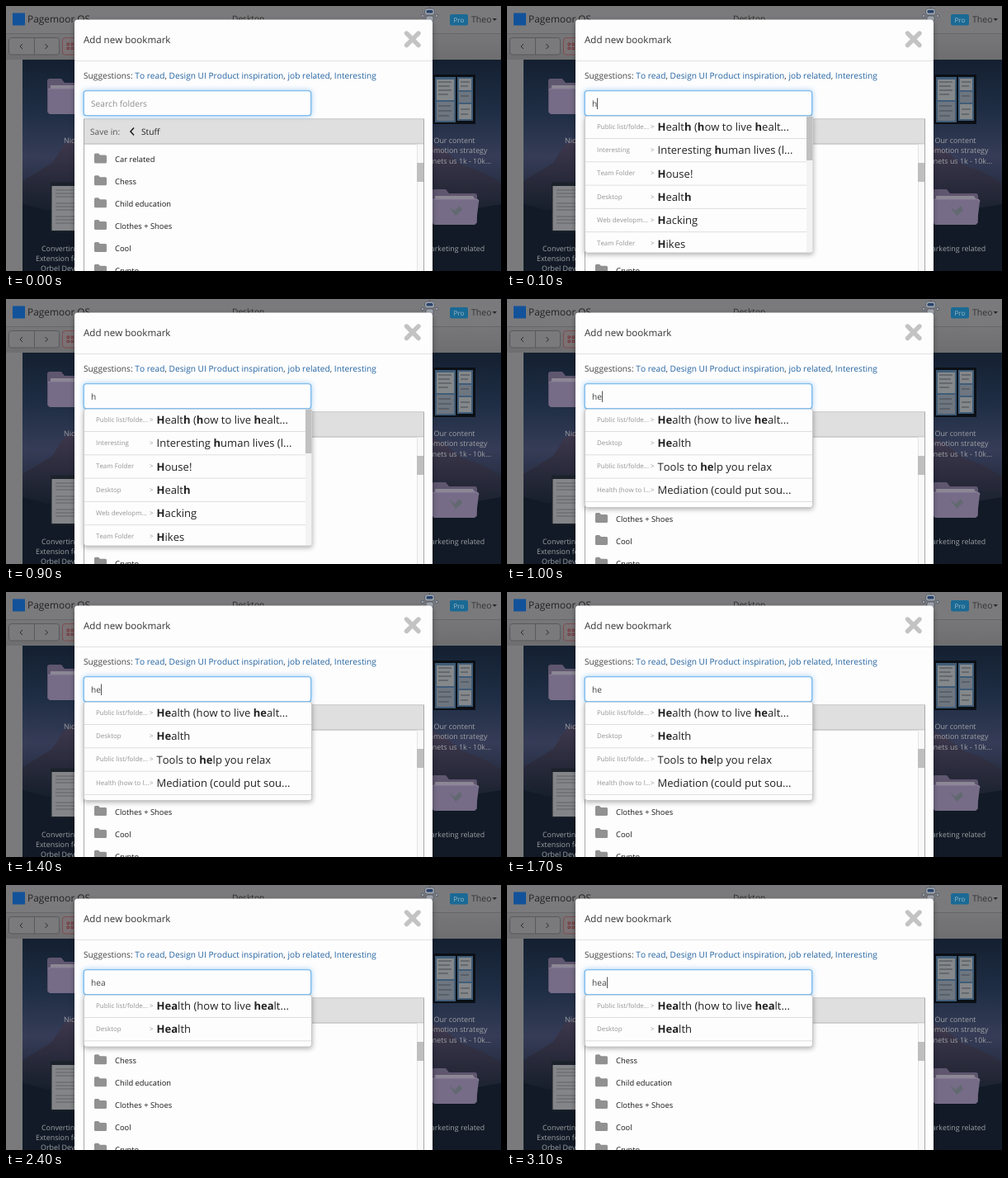
Recreate the animation shown at these times as an HTML page. Size 600 px wide and 321 px high, loop 3200 ms.

```html
<!DOCTYPE html>
<html lang="en">
<head>
<meta charset="utf-8">
<title>Add new bookmark</title>
<style>
html, body { margin: 0; width: 100%; height: 100%; overflow: hidden; background: #7c7c7e; }
svg { display: block; width: 100vw; height: 100vh; }
text {
  font-family: "Open Sans", "Noto Sans", sans-serif; white-space: pre;
  font-kerning: none; text-rendering: geometricPrecision;
}
.mid { font-size: 10.18px; }
.desk { font-size: 8.9px; fill: #a0a2a6; }
.item { font-size: 9.4px; fill: #1a1a1a; }
.crumb { font-size: 7.95px; fill: #959595; }
.hit { font-size: 13.05px; fill: #222; }
.hit tspan { font-weight: 700; }
.link { fill: #23639f; }
</style>
</head>
<body>
<svg viewBox="0 0 600 321" preserveAspectRatio="none">
  <defs>
    <linearGradient id="sky" x1="0" y1="0" x2="0" y2="1">
      <stop offset="0" stop-color="#142031"/>
      <stop offset=".25" stop-color="#1f2e45"/>
      <stop offset=".46" stop-color="#363c57"/>
      <stop offset=".7" stop-color="#1a2434"/>
      <stop offset="1" stop-color="#0d1621"/>
    </linearGradient>
    <linearGradient id="rock" x1="0" y1="0" x2="0" y2="1">
      <stop offset="0" stop-color="#40394e"/>
      <stop offset="1" stop-color="#151e2b"/>
    </linearGradient>
    <linearGradient id="tools" x1="0" y1="0" x2="0" y2="1">
      <stop offset="0" stop-color="#777779"/>
      <stop offset="1" stop-color="#6e6e70"/>
    </linearGradient>
    <filter id="soft" x="-20%" y="-40%" width="140%" height="180%"><feGaussianBlur stdDeviation="3"/></filter>
    <clipPath id="listClip"><rect x="94" y="167" width="404" height="154"/></clipPath>
    <g id="folder">
      <path d="M0 3q0-3 3-3h14l4 5h31q3 0 3 3v33H0z" fill="#5f566f"/>
      <path d="M4 8h46l3 5H4z" fill="#8c8794"/>
      <path d="M1 14q0-2 2-2h51q3 0 3 3l-3 25q0 3-3 3H4q-3 0-3-3z" fill="#766c87"/>
      <path d="M1 14q0-2 2-2h51q3 0 3 3" fill="none" stroke="#8a809a"/>
    </g>
    <path id="dir" d="M0 1.500Q0 0 1.500 0H5l2 2h6.500Q15 2 15 3.500V10.500Q15 12 13.500 12H1.500Q0 12 0 10.500z" fill="#919191"/>
  </defs>

  <g id="backdrop">
    <rect width="600" height="321" fill="#7a7a7c"/>
    <rect y="33" width="600" height="32" fill="url(#tools)"/>
    <path d="M0 33.500H600" stroke="#666668"/>
    <rect x="8" y="8.500" width="15" height="15" fill="#12529a"/>
    <text x="26" y="20.300" font-size="11.9" fill="#232325">Pagemoor OS</text>
    <text class="mid" x="274" y="19.200" fill="#2a2a2c">Desktop</text>
    <g fill="#9ea3ab" stroke="#48505e" stroke-width=".7">
      <path d="M513.500 1V4"/>
      <rect x="507.500" y="3" width="12" height="8" rx="3"/>
      <rect x="509" y="12" width="9" height="7" rx="2"/>
      <circle cx="505" cy="12" r="1.800"/><circle cx="522" cy="12" r="1.800"/>
    </g>
    <rect x="509.500" y="5" width="8" height="3.500" rx="1.500" fill="#28436b"/>
    <rect x="538" y="10" width="22" height="13.500" rx="2" fill="#1a6a95"/>
    <text x="549" y="19.800" font-size="8" text-anchor="middle" fill="#a3bac6">Pro</text>
    <text x="564" y="20.400" font-size="10.6" fill="#333335">Theo</text>
    <path d="M589.500 15h5.500l-2.750 3z" fill="#29292b"/>

    <rect x="3.500" y="38.500" width="61" height="20.500" rx="3" fill="#7a7a7c" stroke="#59595b"/>
    <path d="M34.500 39v20" stroke="#59595b"/>
    <path d="M20 46l-3 3 3 3M47.500 46l3 3-3 3" fill="none" stroke="#2a2a2c"/>
    <rect x="68.500" y="38.500" width="30" height="20.500" rx="3" fill="#7a7274" stroke="#7d4d50"/>
    <path d="M74 45h2.500v2.500h-2.500zM79 45h2.500v2.500h-2.500zM74 50h2.500v2.500h-2.500zM79 50h2.500v2.500h-2.500z" fill="none" stroke="#743338"/>

    <rect x="20" y="65" width="580" height="256" fill="url(#sky)"/>
    <path d="M20 212L40 200 56 190 70 168 83 160V250H20z" fill="url(#rock)"/>
    <path d="M517 168L532 176 552 192 574 200 600 214V262H517z" fill="url(#rock)"/>
    <path d="M20 240L50 248 83 238V321H20zM517 250L565 246 600 240V321H517z" fill="#111a26"/>

    <use href="#folder" x="50" y="88"/>
    <text class="desk" x="70" y="165.500">Nice</text>
    <rect x="54" y="213.500" width="50" height="60" fill="#1c222b"/>
    <rect x="55.500" y="218" width="48" height="54" fill="#848588"/>
    <path d="M60 223h26M60 227h32M60 231h30M60 239h32M60 243h28M60 247h32M60 255h24M60 259h30M60 263h30" stroke="#616266"/>
    <text class="desk" x="43" y="296.500">Converting</text>
    <text class="desk" x="36" y="308.500">Extension for</text>
    <text class="desk" x="42" y="320.500">Orbel Dev</text>

    <rect x="518" y="83" width="51" height="60" fill="#0b0f15"/>
    <path d="M520 86h25v55h-25zM547 86h19v53h-19z" fill="#405d78"/>
    <path d="M522 89h21v25h-21zM549 88h15v14h-15zM549 119h15v18h-15z" fill="#85888b"/>
    <path d="M522 116h21v23h-21zM549 104h15v13h-15z" fill="#6e7680"/>
    <path d="M524 92h16M524 97h14M524 102h16M524 107h12M551 92h11M551 97h9M524 121h15M524 127h16M524 133h13M551 109h10M551 125h11M551 131h9" stroke="#444a53"/>
    <text class="desk" x="543.500" y="165.500" text-anchor="middle">Our content</text>
    <text class="desk" x="543.500" y="178" text-anchor="middle">promotion strategy</text>
    <text class="desk" x="588" y="190.500" text-anchor="end">nets us 1k - 10k...</text>
    <use href="#folder" x="516" y="222"/>
    <path d="M537 243l7 5 6-6 3 5-8 7z" fill="#626970"/>
    <text class="desk" x="543.500" y="296.500" text-anchor="middle">Marketing related</text>
  </g>

  <rect x="83" y="19" width="434" height="330" rx="4" fill="#000" opacity=".35" filter="url(#soft)"/>
  <rect x="83" y="16.500" width="434" height="330" rx="4" fill="#fdfdfe"/>
  <text x="94" y="45" font-size="11.6" fill="#333">Add new bookmark</text>
  <path d="M485.500 33L500 47.500M500 33L485.500 47.500" stroke="#c3c3c3" stroke-width="5.400" stroke-linecap="round"/>
  <path d="M83 66.500H517" stroke="#e2e2e2"/>
  <text class="mid" x="94" y="88" fill="#444">Suggestions: <tspan class="link">To read</tspan>, <tspan class="link">Design UI Product inspiration</tspan>, <tspan class="link">job related</tspan>, <tspan class="link">Interesting</tspan></text>

  <rect x="94.500" y="137" width="412" height="200" fill="#fdfdfe" stroke="#a9a9a9"/>
  <rect x="95" y="137.500" width="411" height="29" fill="#dfdfdf"/>
  <path d="M94 167H506" stroke="#a9a9a9"/>
  <text class="mid" x="102" y="155.500" fill="#555">Save in:</text>
  <path d="M155 147.500l-4 4.500 4 4.500" fill="none" stroke="#222" stroke-width="1.600"/>
  <text class="mid" x="164" y="155.500" fill="#222">Stuff</text>
  <g id="list" clip-path="url(#listClip)"></g>
  <rect x="498" y="167.500" width="8" height="154" fill="#f8f8f8"/>
  <path d="M498.500 167.500V321" stroke="#e4e4e4"/>
  <rect x="498" y="190" width="8" height="23" fill="#bfbfbf"/>

  <rect x="93.500" y="102" width="277" height="31.500" rx="4" fill="#66afe9" opacity=".6" filter="url(#soft)"/>
  <g id="menu">
    <rect class="h" x="94" y="135" width="277" fill="#000" opacity=".32" filter="url(#soft)"/>
    <rect class="h" x="94.500" y="133" width="276" rx="3" fill="#fdfdfe" stroke="#c8c8c8"/>
    <g id="rows"></g>
    <g id="bar">
      <rect x="363" y="134" width="7.500" height="164" fill="#f3f3f3"/>
      <rect x="363" y="134" width="7.500" height="53" fill="#c1c1c1"/>
    </g>
  </g>

  <rect x="94.200" y="102.700" width="275.500" height="30" rx="3" fill="#fdfdfe" stroke="#66afe9" stroke-width="1.100"/>
  <text id="query" class="mid" x="103" y="122"></text>
  <path id="caret" stroke="#555"/>
</svg>
<script>
const LOOP = 3200, BLINK = 500, PITCH = 28.3;
const $ = id => document.getElementById(id);

const hints = {
  health: ["Public list/folde...", "Health (how to live healt..."],
  short: ["Desktop", "Health"],
};
const steps = [
  { at: 0, query: "", rows: [], height: 0 },
  { at: 100, query: "h", height: 166, scroll: true, rows: [
    hints.health, ["Interesting", "Interesting human lives (l..."], ["Team Folder", "House!"],
    hints.short, ["Web developm...", "Hacking"], ["Team Folder", "Hikes"]] },
  { at: 1000, query: "he", height: 119.5, rows: [
    hints.health, hints.short, ["Public list/folde...", "Tools to help you relax"],
    ["Health (how to l...", "Mediation (could put sou..."]] },
  { at: 1800, query: "hea", height: 63, rows: [hints.health, hints.short] },
];

$("list").innerHTML = ["Car related", "Chess", "Child education", "Clothes + Shoes", "Cool", "Crypto"]
  .map((name, i) => {
    const y = 186 + i * 26.85;
    return `<use href="#dir" x="107" y="${y - 7.5}"/><text class="item" x="132" y="${y + 3.4}">${name}</text>`;
  }).join("");

const mark = (text, query) => text.replace(new RegExp(query, "gi"), "<tspan>$&</tspan>");

function rowMarkup([crumb, name], i, step) {
  const y = 146 + i * PITCH, line = y + 14.5;
  const rule = step.scroll && i === step.rows.length - 1 ? ""
    : `<path d="M95 ${line}H${step.scroll ? 363 : 370}" stroke="#dedede"/>`;
  return `<text class="crumb" x="109" y="${y + 2.8}">${crumb}</text>` +
    `<text class="crumb" x="174" y="${y + 2.8}">&gt;</text>` +
    `<text class="hit" x="182.5" y="${y + 5}">${mark(name, step.query)}</text>` + rule;
}

function show(step) {
  const { query, rows, height, scroll } = step;
  $("query").textContent = query || "Search folders";
  $("query").setAttribute("fill", query ? "#444" : "#8c8c8c");
  $("menu").style.display = rows.length ? "" : "none";
  $("bar").style.display = scroll ? "" : "none";
  $("rows").innerHTML = rows.map((row, i) => rowMarkup(row, i, step)).join("");
  document.querySelectorAll("#menu .h").forEach(r => r.setAttribute("height", height));
  const x = Math.round(103 + $("query").getComputedTextLength()) + 0.5;
  $("caret").setAttribute("d", `M${x} 111.5V125`);
}

let current;
function render(t) {
  const step = steps.filter(s => s.at <= t).pop();
  if (step !== current) show(current = step);
  const lit = step.query && Math.floor((t - step.at) / BLINK) % 2 === 0;
  $("caret").style.display = lit ? "" : "none";
}

const start = performance.now();
function tick() {
  render((performance.now() - start) % LOOP);
  requestAnimationFrame(tick);
}
tick();
</script>
</body>
</html>
```
